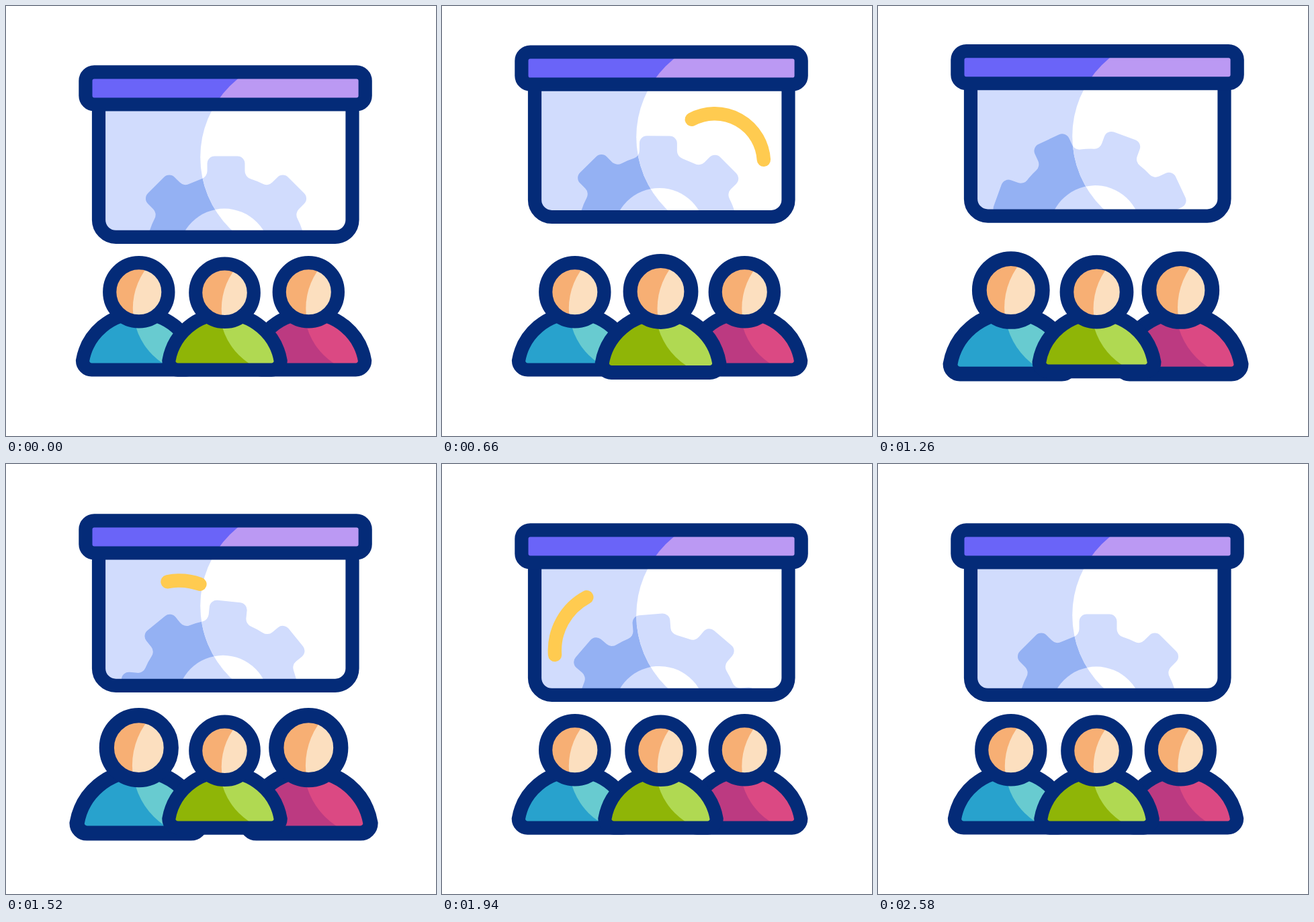
An HTML page for the animation above (2.72 s loop, 640 by 640 pixels).

```html
<!DOCTYPE html>
<html lang="en">
<head>
<meta charset="utf-8">
<title>Presentation</title>
<style>
html, body { margin: 0; width: 100%; height: 100%; overflow: hidden; background: #fff; }
svg { display: block; width: 100vw; height: 100vh; }
.line { fill: none; stroke: #042b78; stroke-width: 20.2; vector-effect: non-scaling-stroke; }
.arc { fill: none; stroke: #ffcb50; stroke-width: 20.4; stroke-linecap: round; }
</style>
</head>
<body>
<svg viewBox="0 0 640 640">
  <defs>
    <clipPath id="panel"><path d="M138 140V318a25.5 25.5 0 0 0 25.5 25.8H490a25.5 25.5 0 0 0 25.5-25.8V140Z"/></clipPath>
    <clipPath id="glow"><circle cx="438.8" cy="225" r="149.6"/></clipPath>
    <path id="teeth"/>
    <path id="body" d="M-83.8 66A85 85 0 0 1 83.8 66A13.6 13.6 0 0 1 70 79.5H-70A13.6 13.6 0 0 1 -83.8 66Z"/>
    <circle id="head" cy="-36.2" r="43.6"/>
    <rect id="bar" x="118.4" y="98.3" width="416.3" height="48.2" rx="13"/>
  </defs>
  <g id="screen">
    <g clip-path="url(#panel)">
      <rect x="130" y="130" width="400" height="230" fill="#d1dcfd"/>
      <use href="#teeth" class="gear" fill="#94b1f3"/>
      <circle class="hole" r="68.4" fill="#d1dcfd"/>
      <g clip-path="url(#glow)">
        <rect x="130" y="130" width="400" height="230" fill="#fff"/>
        <use href="#teeth" class="gear" fill="#d1dcfd"/>
        <circle class="hole" r="68.4" fill="#fff"/>
      </g>
    </g>
    <path class="arc" id="arcR"/>
    <path class="arc" id="arcL"/>
    <path class="line" d="M138 146V318a25.5 25.5 0 0 0 25.5 25.8H490a25.5 25.5 0 0 0 25.5-25.8V146"/>
    <use href="#bar" fill="#6a64f8"/>
    <g clip-path="url(#glow)"><use href="#bar" fill="#bb99f3"/></g>
    <use href="#bar" class="line"/>
  </g>
  <g id="people"></g>
</svg>
<script>
const LOOP = 2720;
const $ = id => document.getElementById(id);
const all = name => document.querySelectorAll('.' + name);
const rad = deg => deg * Math.PI / 180;

// sine ease in and out between two times
function ease(t, from, to) {
  const x = Math.min(1, Math.max(0, (t - from) / (to - from)));
  return (1 - Math.cos(Math.PI * x)) / 2;
}
const swing = (t, start, peak, end) => t < peak ? ease(t, start, peak) : 1 - ease(t, peak, end);

function turn(x, y, deg) {
  const c = Math.cos(rad(deg)), s = Math.sin(rad(deg));
  return [x * c - y * s, x * s + y * c];
}

function gearPath() {
  const tip = 147.5, root = 119.5, half = 28, corner = 11, fillet = 12;
  const fx = half + fillet, fy = Math.sqrt((root + fillet) ** 2 - fx * fx);
  const k = root / (root + fillet);
  let d = '';
  for (let i = 0; i < 8; i++) {
    const at = (x, y) => turn(x, -y, i * 45).map(v => v.toFixed(2)).join(' ');
    const arc = (r, sweep, x, y) => `A${r} ${r} 0 0 ${sweep} ${at(x, y)}`;
    d += (i ? arc(root, 1, -fx * k, fy * k) : 'M' + at(-fx * k, fy * k))
      + arc(fillet, 0, -half, fy)
      + 'L' + at(-half, tip - corner)
      + arc(corner, 1, corner - half, tip)
      + 'L' + at(half - corner, tip)
      + arc(corner, 1, half, tip - corner)
      + 'L' + at(half, fy)
      + arc(fillet, 0, fx * k, fy * k);
  }
  return d + 'Z';
}
$('teeth').setAttribute('d', gearPath());

// a shape with a lighter part cut by a large circle, and its outline
const layer = (shape, id, shift, dark, light) => `
  <clipPath id="${shape + id}"><circle cx="${89 + shift}" cy="-12" r="98"/></clipPath>
  <use href="#${shape}" fill="${dark}"/>
  <g clip-path="url(#${shape + id})"><use href="#${shape}" fill="${light}"/></g>
  <use href="#${shape}" class="line"/>`;

const people = [
  { x: 197.8, y: 462, size: 1, start: 1000, face: 0, coat: 0.5, dark: '#28a2cd', light: '#68cbd0' },
  { x: 450.3, y: 462, size: 1, start: 1000, face: 5, coat: 2.5, dark: '#bc3a81', light: '#db4983' },
  { x: 325.5, y: 462.7, size: 0.993, start: 470, face: 4.2, coat: 1.5, dark: '#8fb507', light: '#b0d952' }
];
$('people').innerHTML = people.map((p, i) => `<g>
  ${layer('body', i, p.coat, p.dark, p.light)}
  ${layer('head', i, p.face, '#f7af74', '#fcdfbf')}</g>`).join('');
people.forEach((p, i) => p.node = $('people').children[i]);

const arcs = [
  { node: $('arcR'), x: 406, y: 263, r: 73, a: -118, b: 16, head: [240, 800], tail: [700, 1090] },
  { node: $('arcL'), x: 258, y: 277.7, r: 90.2, a: -70.3, b: -184, head: [1336, 1866], tail: [1770, 2150] }
];

function drawArc(c, t) {
  const shown = t > c.head[0] && t < c.tail[1] + 30;
  c.node.style.display = shown ? '' : 'none';
  if (!shown) return;
  const point = u => {
    const a = rad(c.a + (c.b - c.a) * u);
    return `${c.x + c.r * Math.cos(a)} ${c.y + c.r * Math.sin(a)}`;
  };
  const from = Math.min(ease(t, ...c.tail), 0.999);
  const to = Math.max(ease(t, ...c.head), from + 0.001);
  c.node.setAttribute('d', `M${point(from)}A${c.r} ${c.r} 0 0 ${c.b > c.a ? 1 : 0} ${point(to)}`);
}

function draw(t) {
  $('screen').setAttribute('transform', `translate(0 ${-42.4 * swing(t, 200, 928, 1900)})`);

  const angle = 110 * swing(t, 200, 1240, 2440);
  all('gear').forEach(g =>
    g.setAttribute('transform', `translate(324.8 363.4) rotate(${angle}) translate(2.7 7.6)`));
  all('hole').forEach(h =>
    h.setAttribute('transform', `translate(325.25 367.75) rotate(${angle}) translate(-.25 2.25)`));

  arcs.forEach(c => drawArc(c, t));

  people.forEach(p => {
    const s = p.size * (1 + 0.11 * swing(t, p.start, p.start + 412, p.start + 990));
    p.node.setAttribute('transform', `translate(${p.x} ${p.y}) scale(${s})`);
  });
}

const began = performance.now();
function tick() {
  draw((performance.now() - began) % LOOP);
  requestAnimationFrame(tick);
}
draw(0);
requestAnimationFrame(tick);
</script>
</body>
</html>
```
